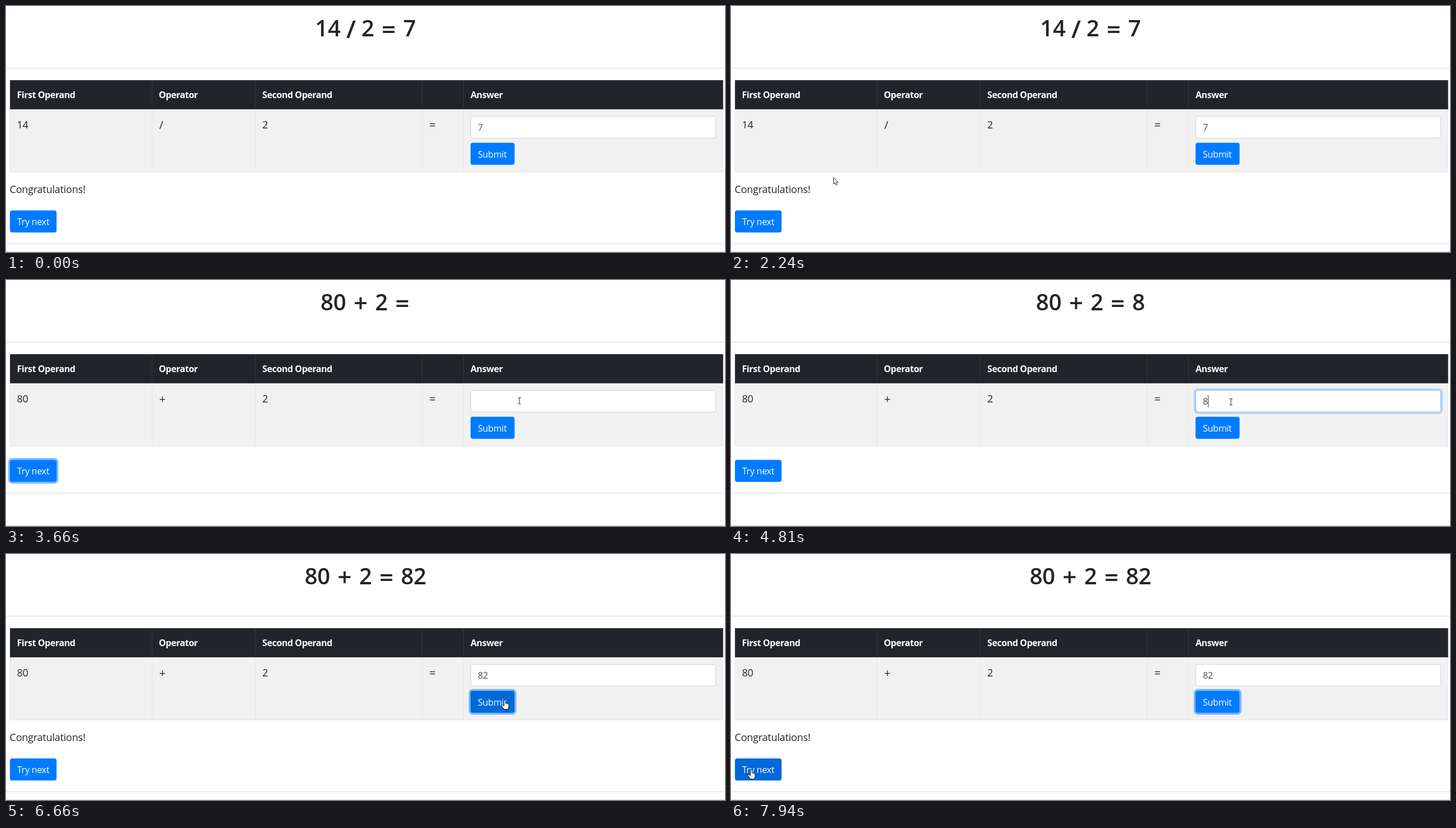
Animation of 1280x438 px, one loop 7990 ms. Source, as an HTML page:

```html
<!DOCTYPE html>
<html lang="en">
<head>
<meta charset="utf-8">
<title>Arithmetic practice</title>
<style>
  html, body { margin: 0; width: 100%; height: 100%; overflow: hidden; background: #fff; }
  svg { display: block; width: 100%; height: 100%; font-family: "Open Sans", "Noto Sans", sans-serif; }
  text { white-space: pre; }
  .title { font-size: 40px; font-weight: 600; letter-spacing: -.15px; fill: #212529; }
  .title .op { font-size: 44px; }
  .head { font-size: 16px; font-weight: 700; letter-spacing: -.45px; fill: #fff; }
  .body { font-size: 18px; letter-spacing: -.22px; fill: #212529; }
  .sign { font-size: 20px; fill: #212529; }
  .label { font-size: 16px; letter-spacing: -.25px; fill: #fff; }
  .value { font-size: 16px; letter-spacing: -.25px; fill: #495057; }
  .rule { fill: #dfdfdf; }
  .ring { fill: none; stroke: #007bff; stroke-width: 3.2; }
</style>
</head>
<body>
<svg id="stage" viewBox="0 0 1280 438">
  <rect width="1280" height="438" fill="#fff"/>
  <text id="title" class="title"></text>
  <rect class="rule" y="110" width="1280" height="1.2"/>
  <rect class="rule" y="436.8" width="1280" height="1.2"/>

  <g id="table">
    <rect x="7" y="184" width="1269.5" height="111.5" fill="#f1f1f1"/>
    <path d="M7.5 184V295.5H1276V184M260 184V295M444 184V295M741 184V295M814.5 184V295"
          fill="none" stroke="#e1e4e8"/>
    <rect x="7" y="132" width="1269.5" height="52" fill="#212529"/>
    <path d="M7.5 183V132.5H1276V183M260 132V184M444 132V184M741 132V184M814.5 132V184M7 183H1276.5"
          fill="none" stroke="#32383e"/>
    <g class="head">
      <text x="19.5" y="164">First Operand</text>
      <text x="272" y="164">Operator</text>
      <text x="456.3" y="164">Second Operand</text>
      <text x="827" y="164">Answer</text>
    </g>
    <text id="first" class="body" x="19.5" y="217.5"></text>
    <text id="sign" class="sign" x="272.8" y="218.8"></text>
    <text id="second" class="body" x="456.3" y="217.5"></text>
    <text class="sign" x="753.5" y="218.8">=</text>
  </g>

  <rect id="inputRing" class="ring" x="825.4" y="194.6" width="440.2" height="42.2" rx="5.5"/>
  <rect id="input" x="827.5" y="196.5" width="436" height="38.6" rx="4" fill="#fff"/>
  <text id="value" class="value" x="840" y="222.4"></text>
  <rect id="caret" y="205" width="1" height="21.5" fill="#333"/>

  <g transform="translate(827 243.6)">
    <rect id="submitRing" class="ring" x="-1.6" y="-1.6" width="81.6" height="42.4" rx="5.5"/>
    <rect id="submit" width="78.4" height="39.2" rx="4"/>
    <text class="label" x="13" y="26.2">Submit</text>
  </g>

  <text id="praise" class="body" x="6.5" y="333">Congratulations!</text>
  <g id="nextBox">
    <rect id="nextRing" class="ring" x="-1.6" y="-1.6" width="86.2" height="42.4" rx="5.5"/>
    <rect id="next" width="83" height="39.2" rx="4"/>
    <text class="label" x="12.8" y="26.2">Try next</text>
  </g>
  <rect id="lowRule" class="rule" width="1280" height="1.2"/>

  <circle id="click" r="10" fill="#f0d214" fill-opacity=".55"/>
  <g id="cursor" stroke-linejoin="round">
    <path id="arrow" d="M.5 .3V12L3.1 9.6 4.9 13.7 6.8 12.9 5.1 8.9H8.7Z" fill="#fff" stroke="#222"/>
    <path id="beam" d="M-2.5-5.5H-.8L0-5 .8-5.5H2.5M0-5V5M-2.5 5.5H-.8L0 5 .8 5.5H2.5" fill="none" stroke="#222"/>
    <path id="hand" fill="#fff" stroke="#111" stroke-width=".9"
          d="M-1.5 10V1.6a1.4 1.4 0 0 1 2.8 0V6q1.3-.8 2.3.4 1.3-.6 2.1.5 1.3-.2 1.3 1.3V11.5q0 2-1.2 3.3V16.5H-2.4V15L-5.4 10.8q-.9-1.8.5-2.3 1.1-.1 3.4 2.3Z"/>
  </g>
</svg>
<script>
const LOOP = 7990;
const STEP = 80;         // pointer refresh, ms
const BLINK = 540;       // caret stays this long after a key
const CLICK_TIME = 160;

// Moments of the story, in ms
const PRESS_NEXT = 2660, PRESS_INPUT = 3840, PRESS_SUBMIT = 6130;
const NEW_TASK = PRESS_NEXT + CLICK_TIME;
const FOCUS = PRESS_INPUT + 60;
const SUBMIT = PRESS_SUBMIT + CLICK_TIME;
const TYPE_8 = 4810, TYPE_2 = 5040;

const HOME = [1120, 400];
const MOVES = [
  { from: 70, to: 760, at: [864, 218] },
  { from: 1860, to: 2240, at: [182, 305] },
  { from: 2240, to: 2570, at: [48, 383] },
  { from: 2820, to: 3640, at: [914, 215] },
  { from: 3700, to: 3820, at: [890, 217] },
  { from: 5590, to: 6060, at: [890, 263] },
  { from: SUBMIT, to: 6370, at: [888, 260] },
  { from: 6670, to: 7140, at: [751, 222] },
  { from: 7140, to: 7450, at: [771, 263] },
  { from: 7440, to: 7760, at: [36, 384] }
];

const $ = id => document.getElementById(id);
const set = (id, name, value) => $(id).setAttribute(name, value);
const show = (id, on) => set(id, 'visibility', on ? 'visible' : 'hidden');
const clamp = v => Math.min(1, Math.max(0, v));
const easeOut = k => k * (2 - k);
const ramp = (t, on, off) => clamp((t - on) / 120) * (1 - clamp((t - off) / 120));
const inside = (p, x, y, w, h) => p[0] >= x && p[0] <= x + w && p[1] >= y && p[1] <= y + h;

// Each move starts where the last one ended and advances in steps
function pointer(t) {
  let p = HOME;
  for (const { from, to, at } of MOVES) {
    if (t < from) break;
    const held = t >= to ? to : from + Math.floor((t - from) / STEP) * STEP;
    const k = easeOut((held - from) / (to - from));
    p = p.map((v, i) => v + (at[i] - v) * k);
  }
  return p;
}

// Centred line: digits, signs and gaps have their own advances
let drawnTitle = '';
function drawTitle(line) {
  if (line === drawnTitle) return;
  drawnTitle = line;
  const gap = 11.3;
  const isNumber = s => /\d/.test(s);
  const advance = s => isNumber(s) ? 22.7 * s.length : s === '/' ? 14.5 : 29;
  const parts = line.split(' ');
  const total = parts.reduce((sum, s) => sum + advance(s) + gap, -gap);
  let x = 640 - total / 2;
  $('title').replaceChildren(...parts.map(s => {
    const span = document.createElementNS('http://www.w3.org/2000/svg', 'tspan');
    const op = !isNumber(s);
    span.setAttribute('x', op ? x + advance(s) / 2 : x);
    span.setAttribute('y', op ? 57 : 54);
    if (op) {
      span.setAttribute('class', 'op');
      span.setAttribute('text-anchor', 'middle');
    }
    span.textContent = s;
    x += advance(s) + gap;
    return span;
  }));
}

function drawPointer(t, nextY) {
  const p = pointer(t);
  const onSubmit = inside(p, 827, 244, 78, 39);
  const onNext = inside(p, 7, nextY, 83, 39);
  const onInput = inside(p, 827, 196, 437, 39);
  set('submit', 'fill', onSubmit ? '#0069d9' : '#007bff');
  set('next', 'fill', onNext ? '#0069d9' : '#007bff');

  const shape = onInput ? 'beam' : onSubmit || onNext ? 'hand' : 'arrow';
  const visible = t >= MOVES[0].from;
  for (const id of ['arrow', 'beam', 'hand']) show(id, visible && id === shape);
  const presses = [PRESS_NEXT, PRESS_INPUT, PRESS_SUBMIT];
  show('click', presses.some(at => t >= at && t < at + CLICK_TIME));
  for (const id of ['cursor', 'click']) set(id, 'transform', `translate(${p})`);
}

function render(t) {
  const fresh = t >= NEW_TASK;
  const praised = !fresh || t >= SUBMIT;
  const nextY = praised ? 364 : 320.2;
  const [a, op, b] = fresh ? ['80', '+', '2'] : ['14', '/', '2'];
  const answer = !fresh ? '7' : t < TYPE_8 ? '' : t < TYPE_2 ? '8' : '82';

  drawTitle([a, op, b, '=', answer].join(' ').trim());
  $('first').textContent = a;
  $('sign').textContent = op;
  $('second').textContent = b;
  $('value').textContent = answer;

  show('praise', praised);
  set('nextBox', 'transform', `translate(7 ${nextY})`);
  set('lowRule', 'y', praised ? 422.8 : 379);

  const focus = ramp(t, FOCUS, SUBMIT);
  set('inputRing', 'stroke-opacity', focus * .25);
  set('input', 'stroke', focus > .5 ? '#80bdff' : '#ced4da');
  set('submitRing', 'stroke-opacity', ramp(t, SUBMIT, LOOP) * .5);
  set('nextRing', 'stroke-opacity', ramp(t, PRESS_NEXT + 80, FOCUS) * .5);

  show('caret', [FOCUS, TYPE_8, TYPE_2].some(key => t >= key && t < key + BLINK));
  set('caret', 'x', 840 + answer.length * 9.1);

  drawPointer(t, nextY);
}

const begin = performance.now();
function tick() {
  render((performance.now() - begin) % LOOP);
  requestAnimationFrame(tick);
}
tick();
</script>
</body>
</html>
```
